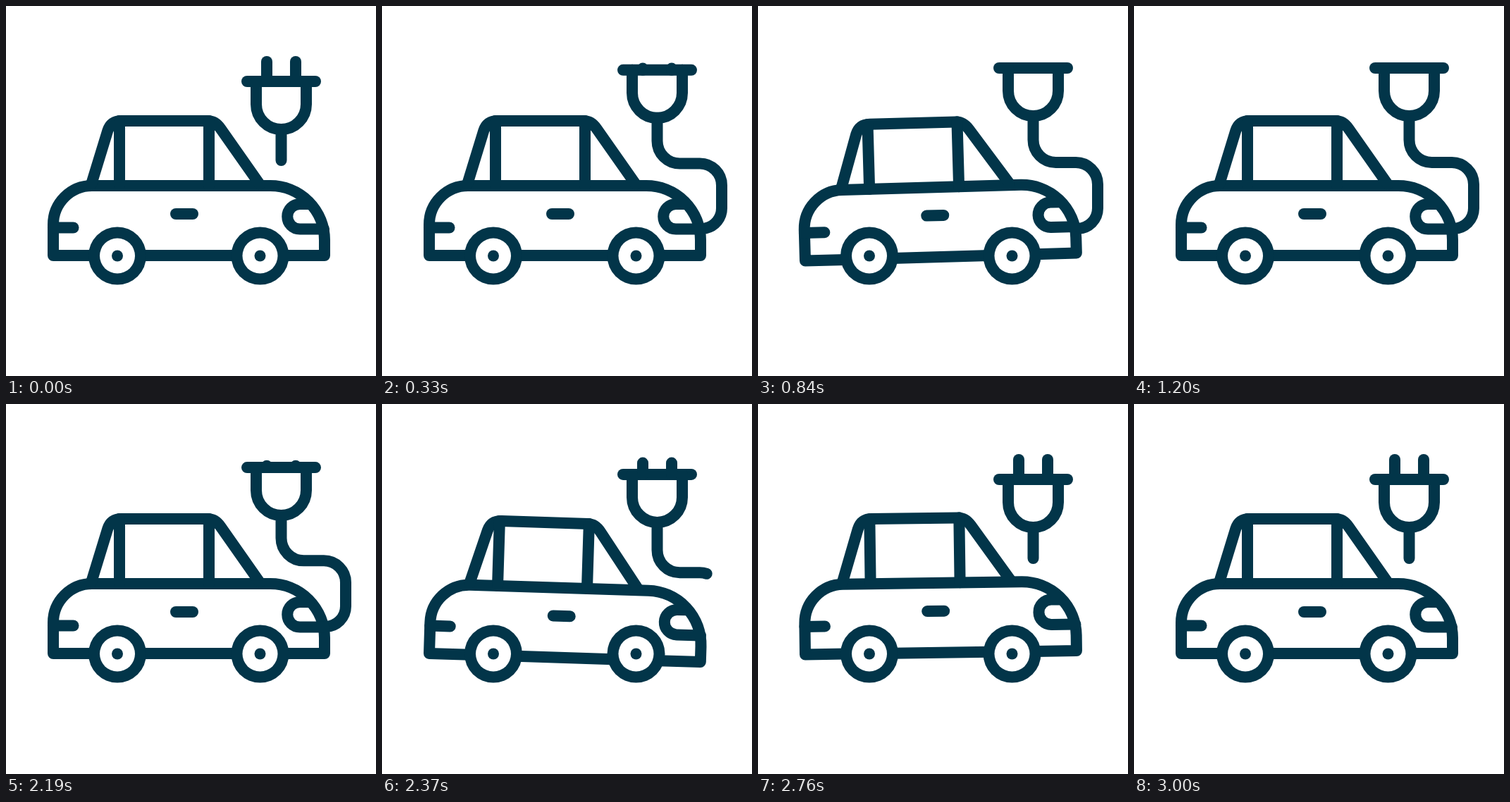
An HTML page with a canvas that plays this animation: 525 by 525 pixels, repeating every 3.09 s.

```html
<!DOCTYPE html>
<html lang="en">
<head>
<meta charset="utf-8">
<title>Electric car charging</title>
<style>
  html, body { margin: 0; width: 100%; height: 100%; overflow: hidden; background: #fff; }
  canvas { display: block; width: 525px; height: 525px; }
</style>
</head>
<body>
<canvas id="stage" width="525" height="525"></canvas>
<script>
const ctx = document.getElementById('stage').getContext('2d');
const INK = '#023549';
const LOOP = 3090, STEP = 30;
const PLUG_IN = 0, PLUG_OUT = 2160;
const JOLTS = [390, 2190];

// Time since the jolt began, then the drop of the front and rear corners.
const SWAY = [
  [0, 0, 0],
  [180, 12, 0],
  [360, -2, -1],
  [465, -3.5, 8],
  [610, -4, 0],
  [705, 4, 0],
  [810, 0, 0]
];

const clamp = v => Math.min(1, Math.max(0, v));
const lerp = (a, b, k) => a + (b - a) * k;
const linear = k => k;
const easeOut = k => 1 - (1 - k) ** 2;
const easeInOut = k => k < 0.5 ? 2 * k * k : 1 - 2 * (1 - k) ** 2;
const easeSine = k => (1 - Math.cos(Math.PI * k)) / 2;

// 1 while unplugged, 0 while plugged in.
function unplugged(t, duration, ease) {
  return t < PLUG_OUT
    ? 1 - ease(clamp((t - PLUG_IN) / duration))
    : ease(clamp((t - PLUG_OUT) / duration));
}

function sway(t) {
  const start = t < JOLTS[1] ? JOLTS[0] : JOLTS[1];
  const time = t - start;
  for (let i = 1; i < SWAY.length; i++) {
    const a = SWAY[i - 1], b = SWAY[i];
    if (time >= a[0] && time < b[0]) {
      const k = easeSine((time - a[0]) / (b[0] - a[0]));
      return { front: lerp(a[1], b[1], k), rear: lerp(a[2], b[2], k) };
    }
  }
  return { front: 0, rear: 0 };
}

function stroke(build) {
  ctx.beginPath();
  build();
  ctx.stroke();
}

function line(x1, y1, x2, y2) {
  stroke(() => {
    ctx.moveTo(x1, y1);
    ctx.lineTo(x2, y2);
  });
}

function drawCable(plugY, pulled) {
  const top = plugY + 68;
  const bend = 190 + 30 * pulled;
  ctx.setLineDash([lerp(241, 44, pulled), 1000]);
  stroke(() => {
    ctx.moveTo(390.5, top);
    ctx.lineTo(390.5, bend);
    ctx.arc(422.5, bend, 32, Math.PI, Math.PI / 2, true);
    ctx.lineTo(451, bend + 32);
    ctx.arc(451, bend + 63, 31, -Math.PI / 2, 0);
    ctx.lineTo(482, 287);
    ctx.arc(453, 287, 29, 0, Math.PI / 2);
  });
  ctx.setLineDash([]);
}

function drawPlug(y, prong) {
  line(342, y, 439, y);
  if (prong > 0) {
    for (const x of [370, 411]) line(x, y, x, y - 28 * prong);
  }
  stroke(() => {
    ctx.moveTo(355, y);
    ctx.lineTo(355, y + 32.5);
    ctx.arc(390.5, y + 32.5, 35.5, Math.PI, 0, true);
    ctx.lineTo(426, y);
  });
}

function drawBody({ front, rear }) {
  ctx.save();
  ctx.translate(67, 354 + rear);
  ctx.rotate(Math.atan2(front - rear, 385));
  ctx.translate(-67, -354);

  stroke(() => {
    ctx.moveTo(125, 354);
    ctx.lineTo(67, 354);
    ctx.lineTo(67, 310);
    ctx.arc(122, 310, 55, Math.PI, -Math.PI / 2);
    ctx.lineTo(375, 255);
    ctx.arc(375, 332, 77, -Math.PI / 2, 0);
    ctx.lineTo(452, 354);
    ctx.lineTo(394, 354);
  });
  line(191, 354, 328, 354);

  // cabin
  stroke(() => {
    ctx.moveTo(121, 253);
    ctx.lineTo(144.3, 177);
    ctx.quadraticCurveTo(149, 163, 164, 163);
    ctx.lineTo(286, 163);
    ctx.quadraticCurveTo(297, 163, 304.5, 174);
    ctx.lineTo(360, 253);
  });
  line(161, 163, 161, 255);
  line(288, 163, 288, 255);

  // door handle, tail light, headlight
  line(241, 295, 265, 295);
  line(67, 314.5, 95.5, 314.5);
  stroke(() => {
    ctx.moveTo(451, 316.5);
    ctx.lineTo(417, 316.5);
    ctx.arc(417, 298.75, 17.75, Math.PI / 2, -Math.PI / 2);
    ctx.lineTo(430, 281);
  });
  ctx.restore();
}

function drawWheel(x) {
  const disc = (r, color) => {
    ctx.fillStyle = color;
    ctx.beginPath();
    ctx.arc(x, 354.5, r, 0, Math.PI * 2);
    ctx.fill();
  };
  disc(41, INK);
  disc(25, '#fff');
  disc(8, INK);
}

function draw(t) {
  ctx.fillStyle = '#fff';
  ctx.fillRect(0, 0, 525, 525);
  ctx.strokeStyle = INK;
  ctx.lineWidth = 16;
  ctx.lineCap = ctx.lineJoin = 'round';

  const plugY = lerp(88, 107, unplugged(t, 540, easeOut));
  drawCable(plugY, unplugged(t, 390, easeInOut));
  drawPlug(plugY, unplugged(t, 360, linear));
  drawBody(sway(t));
  drawWheel(158);
  drawWheel(360.5);
}

const began = performance.now();
function tick() {
  const t = (performance.now() - began) % LOOP;
  draw(Math.floor(t / STEP) * STEP);
  requestAnimationFrame(tick);
}
tick();
</script>
</body>
</html>
```
